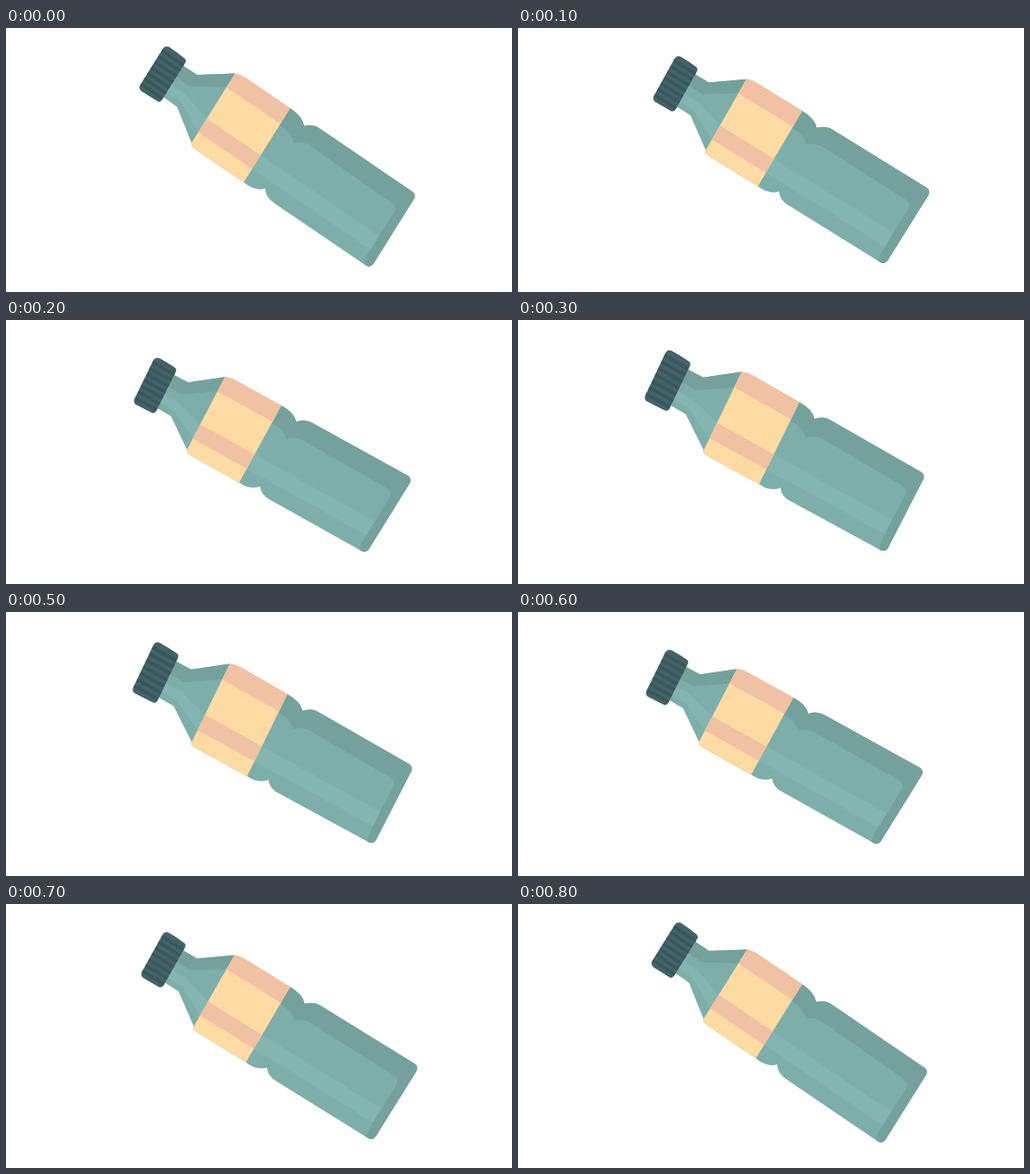
An HTML page with a canvas for the animation above (900 ms loop, 560 px wide and 293 px high).

```html
<!DOCTYPE html>
<html lang="en">
<head>
<meta charset="utf-8">
<title>Bottle</title>
<style>
  html, body { margin: 0; width: 100%; height: 100%; overflow: hidden; background: #fff; }
  canvas { display: block; }
</style>
</head>
<body>
<canvas id="stage" width="560" height="293"></canvas>
<script>
const ctx = document.getElementById('stage').getContext('2d');
const STEP = 100, STEPS = 9;
const LENGTH = 320, HALF = 48, EDGE = 48.5;
const LABEL = 80.5, LABEL_END = 152, WAIST = 175.5, BODY = 193;

// A pose is the tilted frame around the bottle: x, y of cap top, cap bottom, base top, base bottom.
const high = [187.4, 2.8, 136.6, 84.2, 454.4, 185.3, 403.6, 266.7];
const middle = [174.5, 23.4, 132.5, 109.6, 450, 176.2, 399, 258.8];
const low = [175.2, 13.5, 130.8, 107.5, 451, 172, 407, 258];
const between = high.map((n, i) => (n + middle[i]) / 2 + (i % 2 ? 0 : 5));
const lowest = low.map((n, i) => n + 0.4 * (middle[i] - high[i]));
const poses = [high, between, middle, low, lowest];

let pose = high;

// Maps the upright bottle (x along its axis, y across) into the pose with perspective.
function place(x, y) {
  const [ax, ay, bx, by, cx, cy, dx, dy] = pose;
  const depth = Math.hypot(bx - ax, by - ay) / Math.hypot(dx - cx, dy - cy);
  const s = x / LENGTH, v = (y / HALF + 1) / 2;
  const u = s * depth / (s * depth + 1 - s);
  const mix = (a, b, c, d) => (1 - u) * (a + (b - a) * v) + u * (c + (d - c) * v);
  return [mix(ax, bx, cx, dx), mix(ay, by, cy, dy)];
}

// Entries: [x, y] line, [x, y, x, y] quadratic curve, [x, y, x, y, radius] rounded corner.
function trace(entries) {
  ctx.beginPath();
  for (const [x, y, x2, y2, radius] of entries) {
    const p = place(x, y);
    if (radius) ctx.arcTo(...p, ...place(x2, y2), radius);
    else if (x2 !== undefined) ctx.quadraticCurveTo(...p, ...place(x2, y2));
    else ctx.lineTo(...p);
  }
  ctx.closePath();
}

function fill(color, entries) {
  trace(entries);
  ctx.fillStyle = color;
  ctx.fill();
}

const band = (color, left, right, top, bottom) =>
  fill(color, [[left, top], [right, top], [right, bottom], [left, bottom]]);

function clipped(entries, paint) {
  ctx.save();
  trace(entries);
  ctx.clip();
  paint();
  ctx.restore();
}

const upperWaist = inset => [
  [LABEL_END, inset - EDGE],
  [168, inset - 49, WAIST, inset - 41],
  [183, inset - 49, BODY, inset - EDGE]];

const labelTop = [[LABEL, -46], [86, -EDGE, 94, -EDGE]];
const labelBottom = [[LABEL_END, EDGE], [88, EDGE], [LABEL + 1, 47.5], [LABEL, 45]];

const outline = [
  [20, -20.5], [46, -21], ...labelTop, ...upperWaist(0),
  [LENGTH, -EDGE, LENGTH, EDGE, 6], [LENGTH, EDGE, BODY, EDGE, 6],
  [BODY, EDGE], [181, 49, WAIST, 41], [167, 50, LABEL_END, EDGE],
  ...labelBottom, [46, 21], [20, 20.5]];

const label = [...labelTop, [LABEL_END, -EDGE], ...labelBottom];

const cap = [
  [14, -29], [28, -28, 28, 28, 4], [28, 28, -1, 29, 4],
  [-1, 29, -1, -29, 5], [-1, -29, 14, -29, 5]];

function draw() {
  ctx.fillStyle = '#fff';
  ctx.fillRect(0, 0, 560, 293);

  fill('#7eaeaa', outline);
  clipped(outline, () => {
    const shade = '#75a19d', shine = '#83b5b1';
    fill(shine, [[20, 4], [46, 4], [LABEL, 13], [LABEL, 31], [46, 14], [20, 14]]);
    band(shine, LABEL_END, 310, 13, 31);
    fill(shade, [[20, -60], [LABEL, -60], [LABEL, -28], [46, -6], [20, -6]]);
    fill(shade, [
      [LABEL_END, -60], ...upperWaist(22), [309, -25, 309, 40, 7], [309, 40],
      [314, 60], [330, 60], [330, -60]]);
  });

  fill('#ffdba4', label);
  clipped(label, () => {
    band('#f0c1a2', LABEL, LABEL_END, -60, -28);
    band('#f0c1a2', LABEL, LABEL_END, 13, 31);
  });

  fill('#426367', cap);
  clipped(cap, () => {
    for (let y = -23; y < 26; y += 7.3) band('#39575b', -1, 28, y, y + 3.5);
  });
}

function tick() {
  const step = Math.floor(performance.now() / STEP) % STEPS;
  pose = poses[4 - Math.abs(4 - step)];
  draw();
  requestAnimationFrame(tick);
}
tick();
</script>
</body>
</html>
```
